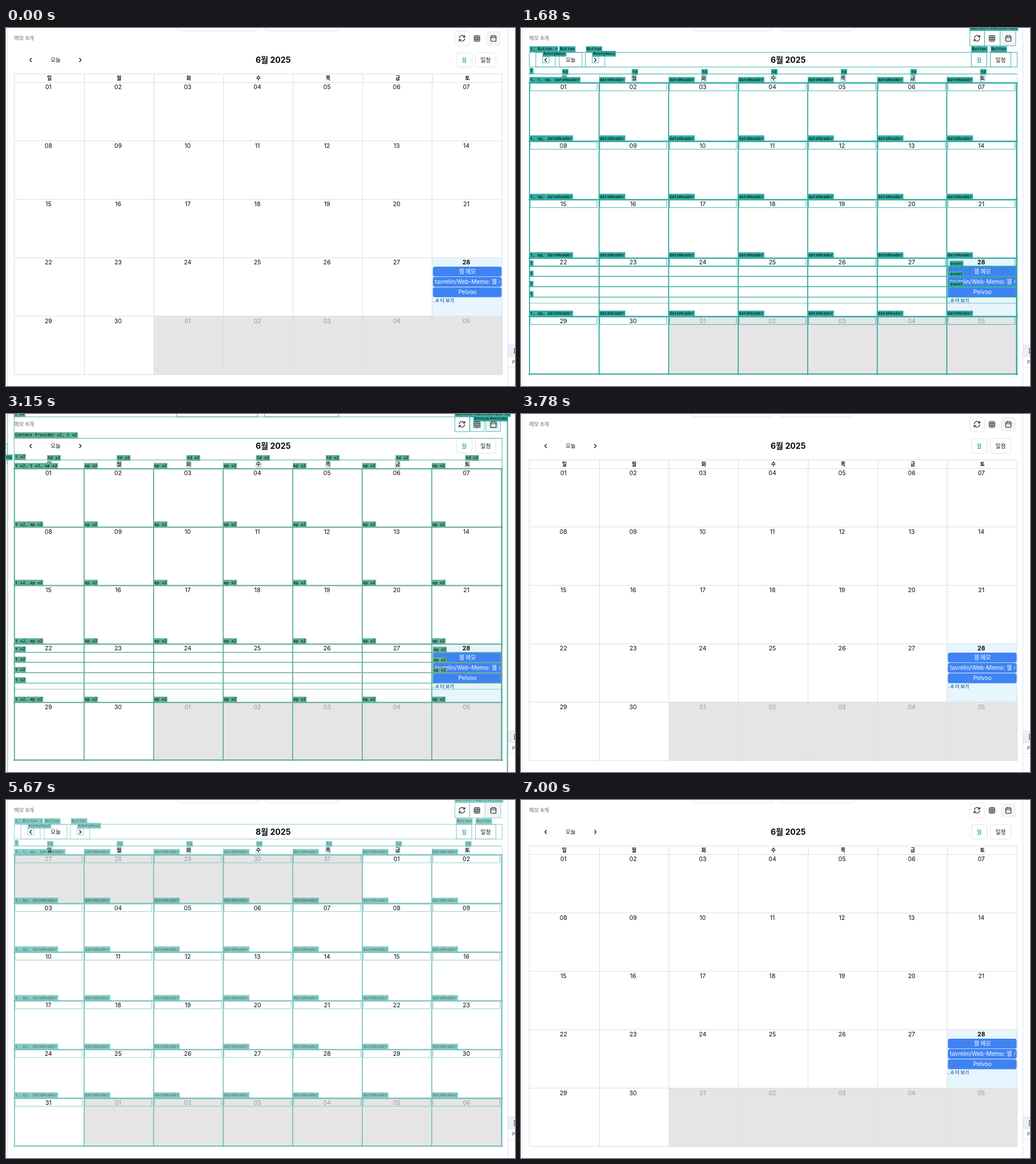
An HTML page for the animation above (7.42 s loop, 893 px wide and 627 px high).

```html
<!DOCTYPE html>
<html lang="ko">
<head>
<meta charset="utf-8">
<style>
html, body { margin: 0; width: 100%; height: 100%; overflow: hidden; background: #fff; }
svg { display: block; width: 893px; height: 627px; }
text { font-family: Inter, "Noto Sans CJK KR", "Noto Sans CJK", sans-serif; white-space: pre; }
.mono { font-family: "DejaVu Sans Mono", monospace; }
</style>
</head>
<body>
<svg id="stage" viewBox="0 0 893 627" xmlns="http://www.w3.org/2000/svg">
  <defs><clipPath id="chip"><rect x="750" y="436" width="117" height="18"/></clipPath></defs>
  <g id="chrome"></g><g id="calendar"></g><g id="outlines"></g>
</svg>
<script>
const LOOP = 7420, LEFT = 14.5, RIGHT = 870.5, TOP = 95.5, BOTTOM = 607;
const LINE = '#dddddd', TEAL = '#35aca2', GREEN = '#5fae99';
const byId = id => document.getElementById(id);
const range = n => [...Array(n).keys()];

const text = (x, y, s, size, fill = '#09090b', weight = 400, anchor = 'middle', extra = '') =>
  `<text x="${x}" y="${y + size * .36}" font-size="${size}" fill="${fill}" font-weight="${weight}" text-anchor="${anchor}" ${extra}>${s}</text>`;
const rect = (x, y, w, h, fill, stroke = 'none', r = 0, width = 1) =>
  `<rect x="${x}" y="${y}" width="${w}" height="${h}" fill="${fill}" stroke="${stroke}" stroke-width="${width}" rx="${r}"/>`;
const path = (d, stroke = LINE, width = 1) =>
  `<path d="${d}" fill="none" stroke="${stroke}" stroke-width="${width}" stroke-linecap="round" stroke-linejoin="round"/>`;
const hline = (y, a = LEFT, b = RIGHT, c = LINE, w = 1) => path(`M${a} ${y}H${b}`, c, w);
const vline = (x, a, b, c = LINE, w = 1) => path(`M${x} ${a}V${b}`, c, w);

const colX = i => i === 7 ? RIGHT : i ? Math.floor(15 + 122.15 * i) + .5 : LEFT;
const headX = i => Math.floor(15 + 122.3 * i) + .5;
const weeksIn = month => Math.ceil((new Date(2025, month, 1).getDay() + new Date(2025, month + 1, 0).getDate()) / 7);
const rowY = (j, weeks) => TOP + (BOTTOM - TOP) * j / weeks;

function drawChrome() {
  const edge = '#e4e4e7', ink = '#18181b';
  let s = vline(2.5, 0, 627, edge) + vline(880.5, 0, 627, '#d3e3f5');
  s += rect(299.5, -20, 142, 25, '#fff', edge, 4) + rect(453.5, -20, 130, 25, '#fff', edge, 4);
  s += text(14, 18, '메모 6개', 9.6, '#71717a', 400, 'start');
  s += rect(787.5, 5.5, 25.5, 25.5, '#fff', edge, 4) + rect(842, 5, 26, 26, '#f3f4f6', 'none', 4);
  s += path('M795.3 17.5A5 5 0 0 1 804 14.8L805 16M805 12.8V16H801.8M804.8 18.5A5 5 0 0 1 796 21.2L795 20M795 23.2V20H798.2', ink, 1.1);
  s += rect(821.5, 13.5, 9.5, 9.5, 'none', ink, 1.2, 1.1);
  s += path('M821.5 16.7H831M821.5 19.8H831M824.7 13.5V23M827.8 13.5V23', ink, 1);
  s += rect(850.5, 14, 9.2, 9.2, 'none', ink, 1.2, 1.1) + path('M850.5 17H859.7M853.2 12.8V14.8M857 12.8V14.8', ink, 1.1);
  s += path('M44.6 53L41.8 56L44.6 59M129 53L131.8 56L129 59', ink, 1.3);
  s += text(87, 56, '오늘', 9.6, ink, 500);
  s += rect(790.5, 43, 27, 25.5, '#fff', edge, 3) + rect(823.5, 43, 36, 25.5, '#fff', edge, 3);
  s += text(803.7, 56, '월', 9.8, '#0e93a5', 500) + text(841.5, 56, '일정', 9.8, ink, 500);
  s += rect(881, 555.5, 12, 19.5, '#e6f0fd') + hline(555.5, 881, 893, '#d3e3f5') + hline(575.5, 881, 893, '#d3e3f5') + hline(594.5, 881, 893, '#dfe5ec');
  s += [562, 565.5, 569].map(y => rect(891, y - .8, 1.8, 1.8, '#333')).join('');
  return s + text(888, 585, 'P', 8, '#333', 400, 'start');
}

function drawMonth(month) {
  const weeks = weeksIn(month), first = new Date(2025, month, 1).getDay();
  let cells = '', dates = '', s = text(468.7, 56, `${month + 1}월 2025`, 14.1, '#09090b', 700);
  for (const k of range(weeks * 7)) {
    const day = new Date(2025, month, 1 - first + k), i = k % 7;
    const y = rowY(k / 7 | 0, weeks), off = day.getMonth() !== month;
    const today = day.getMonth() === 5 && day.getDate() === 28;
    if (off || today)
      cells += rect(colX(i), y, colX(i + 1) - colX(i), (BOTTOM - TOP) / weeks, off ? '#e5e5e5' : '#e7f5fe');
    dates += text(74.4 + 122.2 * i, y + 8.2, String(day.getDate()).padStart(2, '0'), 10.5, off ? '#999' : '#09090b', today ? 700 : 400);
  }
  s += cells + rect(LEFT, 80.5, RIGHT - LEFT, BOTTOM - 80.5, 'none', LINE);
  s += range(6).map(i => vline(headX(i + 1), 80.5, TOP) + vline(colX(i + 1), TOP, BOTTOM)).join('');
  s += range(weeks).map(j => hline(rowY(j, weeks))).join('');
  s += [...'일월화수목금토'].map((d, i) => text(76 + 122.25 * i, 88, d, 8.8, '#09090b', 700)).join('');
  return s + dates + (month === 5 ? drawEvents() : '');
}

function drawEvents() {
  const chips = [418, 436, 454.2].map(y => rect(749, y, 120.5, 17.2, '#3f83f3', 'none', 3.5)).join('');
  return chips + text(809.5, 426.6, '웹 메모', 9.8, '#fff', 500)
    + text(752.5, 444.6, 'tavrelin/Web-Memo: 웹 사이트', 10, '#fff', 400, 'start', 'clip-path="url(#chip)"')
    + text(809.5, 462.8, 'Pelvoo', 10, '#fff')
    + text(749, 477, '..6 더 보기', 8.2, '#3174ad', 700, 'start');
}

function label(x, y, s, fill) {
  return rect(x, y - 5, s.length * 4.34 + 2.5, 10, fill)
    + `<text class="mono" x="${x + 1.2}" y="${y + 2.4}" font-size="7.2" fill="#000">${s}</text>`;
}

// Outlines shared by both kinds of re-render; "tail" is appended to each component name.
function drawGrid(month, color, tail, cellName) {
  const weeks = weeksIn(month), name = s => s + tail;
  let s = hline(80.5, 14, 870, color), tags = label(15, 75, name('t'), color);
  s += range(weeks + 1).map(j => hline(rowY(j, weeks) + (j === weeks ? -1 : .5), 14, 871, color, 2)).join('');
  s += range(8).map(i => vline(i === 7 ? 869.7 : colX(i) - (i ? .5 : -.4), 96, 607, color, i === 7 ? 2.6 : 1.8)).join('');
  for (const i of range(7)) {
    s += rect(72 + 122.25 * i, 84, 8.5, 9.5, 'none', color, 0, .7);
    tags += label(72 + 122.25 * i, 77, name('td'), color);
  }
  for (const j of range(weeks)) for (const i of range(7)) {
    const lead = i ? '' : name('t') + ', ' + (j ? '' : name('t') + ', ');
    const middle = i || cellName === 'ep' ? '' : 'ep, ';
    tags += label(i ? colX(i) - .5 : 15, rowY(j, weeks) - 4.7, lead + middle + name(cellName), color);
  }
  if (month === 5) {
    s += [417.5, 435, 453, 471.3, 482].map(y => hline(y, 14, 869, color, y > 480 ? .7 : 1.3)).join('');
    s += [418, 436, 454.2].map(y => rect(749, y, 119.5, 17, 'none', color)).join('');
    tags += [412, 430, 448, 466].map(y => label(15, y, name('t'), color)).join('');
    tags += [412.5, 430.7, 449].map(y => label(tail ? 749 : 752, y, tail ? 'ep x2' : 'event', color)).join('');
  }
  return s + tags;
}

function drawNavigation(month) {
  const weeks = weeksIn(month), box = (x, y, w, h) => rect(x, y, w, h, 'none', TEAL, 0, .9);
  let s = box(14.5, 42.5, 856, 25.8);
  s += [[26, 34], [67, 40], [113, 34], [790, 27], [823.5, 36]].map(([x, w]) => box(x, 43, w, 25.3)).join('');
  s += box(38, 50, 11, 11) + box(125, 50, 11, 11);
  s += box(787.5, -5, 80.5, 36) + vline(813.5, 0, 31, TEAL) + vline(840.5, 0, 31, TEAL);
  for (const j of range(weeks)) for (const i of range(7))
    s += box(16 + 122.2 * i, rowY(j, weeks) + 1.5, 117.5, 13);
  const tags = [[15, 37, 't, Button r'], [67, 37, 'Button'], [114, 37, 'Button'], [790, 37, 'Button'], [824, 37, 'Button'],
    [38, 45, 'Anonymous'], [125, 45, 'Anonymous'], [787.5, 0, 'ButtonPrimitive.div']];
  return s + drawGrid(month, TEAL, '', 'dateHeader') + tags.map(t => label(...t, TEAL)).join('');
}

function drawRefresh(month) {
  const box = (x, y, w, h, c = TEAL) => rect(x, y, w, h, 'none', c, 0, .8);
  let s = vline(2.8, 0, 627, GREEN, .8) + vline(14.3, 0, 608, GREEN) + vline(879.7, 0, 627, GREEN, 2);
  s += hline(5, 14, 879, GREEN) + hline(42.5, 14, 871, GREEN) + vline(870.3, 42, 607, GREEN);
  s += box(299.5, -5, 142, 10) + box(453.5, -5, 130, 10) + box(-3, 52, 5.3, 34);
  s += box(787.5, -5, 26, 36) + box(814, 5.5, 25, 25) + box(842, 5.5, 25.5, 25);
  s += box(820, 12, 12.5, 12.5) + box(849, 12, 12.5, 12.5);
  const tags = [[14, 0, 't x2', GREEN], [15, 37, 'Context.Provider x2, t x2', GREEN], [787.5, 0, 'ButtonPrimitive.div x2', TEAL],
    [820, 8, 'Anonymou', TEAL], [848, 8, 'Anonymo', TEAL], [-4, 76, 'enu', TEAL]];
  return s + drawGrid(month, GREEN, ' x2', 'ep') + tags.map(t => label(...t)).join('');
}

// Each burst appears at full strength and fades at the listed steps (units of 70 ms).
const bursts = [
  { month: 6, draw: drawNavigation, steps: [12, 13, 14, 15, 16, 17] },
  { month: 5, draw: drawNavigation, steps: [24, 25, 26, 28, 29] },
  { month: 5, draw: drawRefresh, steps: [34, 35, 36, 37, 40, 41, 42] },
  { month: 5, draw: drawRefresh, steps: [45, 46, 47, 48, 49, 50, 52, 53, 54] },
  { month: 6, draw: drawNavigation, steps: [60, 61, 62, 64, 68, 69] },
  { month: 7, draw: drawNavigation, steps: [78, 79, 81, 82, 85, 86] },
  { month: 5, draw: drawNavigation, steps: [90, 91, 92] },
  { month: 5, draw: drawRefresh, steps: [92, 93, 94, 95, 96, 98, 99, 100] }
];

let shownMonth, shownBurst;
function update(ms) {
  const tick = Math.floor(ms % LOOP / 70);
  const burst = bursts.filter(b => b.steps[0] <= tick).pop();
  const month = burst ? burst.month : 5;
  if (month !== shownMonth) byId('calendar').innerHTML = drawMonth(shownMonth = month);
  if (burst !== shownBurst) {
    shownBurst = burst;
    byId('outlines').innerHTML = burst ? burst.draw(month) : '';
  }
  const passed = burst ? burst.steps.filter(step => step <= tick).length - 1 : 0;
  byId('outlines').setAttribute('opacity', burst ? 1 - passed / (burst.steps.length - 1) : 0);
}

byId('chrome').innerHTML = drawChrome();
const start = performance.now();
function frame() {
  update(performance.now() - start);
  requestAnimationFrame(frame);
}
frame();
</script>
</body>
</html>
```
